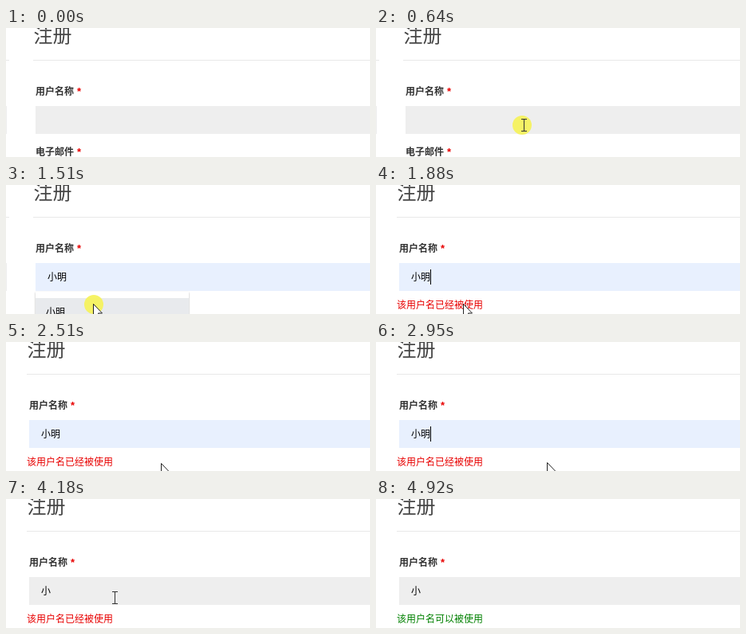
These frames come from a looping animation (456x162 px, 6.55 s). An HTML page:

```html
<!DOCTYPE html>
<html lang="zh-CN">
<head>
<meta charset="utf-8">
<title>注册</title>
<style>
  html, body { margin: 0; width: 100%; height: 100%; overflow: hidden; background: #fff; }
  svg { display: block; }
  text { font: 12px "Noto Sans CJK SC", "Noto Sans CJK", sans-serif; fill: #000; }
  .title { font-size: 24px; font-weight: 300; fill: #444; }
  .label { font-weight: 700; fill: #333; }
  .star { font: bold 13px "Liberation Sans", sans-serif; fill: #e80000; }
  rect { shape-rendering: crispEdges; }
</style>
</head>
<body>
<svg width="456" height="162" viewBox="0 0 456 162">
  <defs>
    <filter id="shadow" x="-5%" y="-20%" width="110%" height="140%">
      <feDropShadow dx="0" dy="1" stdDeviation="1" flood-color="#000" flood-opacity=".3"/>
    </filter>
  </defs>
  <rect width="456" height="162" fill="#fff"/>
  <g id="page">
    <text class="title" x="34.5" y="18">注册</text>
    <rect x="-40" y="40" width="44" height="1" fill="#e8e8e8"/>
    <rect x="34" y="40" width="440" height="1" fill="#e8e8e8"/>
    <rect x="-40" y="98" width="41" height="35" fill="#eee"/>
    <text class="label" x="37" y="84">用户名称</text>
    <text class="star" x="89" y="84">*</text>
    <rect id="field" x="37" y="98" width="440" height="35"/>
    <text id="value" x="52" y="119.5"></text>
    <rect id="caret" y="106" width="1" height="19" fill="#000"/>
    <g id="email">
      <text class="label" x="37" y="160">电子邮件</text>
      <text class="star" x="89" y="160">*</text>
    </g>
    <text id="note" x="34" y="155"></text>
    <g id="menu">
      <rect x="37" y="134" width="192" height="50" fill="#fff" filter="url(#shadow)"/>
      <rect id="hover" x="37" y="142" width="192" height="40" fill="#e8eaed"/>
      <text x="50" y="164">小明</text>
    </g>
  </g>
  <g id="pointer">
    <circle id="glow" r="12" fill="#f5f25a" fill-opacity=".93"/>
    <path id="arrow" d="M.5 .5V16.5L4 13L6.6 18.6L9 17.6L6.5 12H11.5Z" fill="#fff" stroke="#222"/>
    <path id="beam" d="M-3 -7.5H4M.5 -7.5V7.5M-3 7.5H4" fill="none" stroke="#333"/>
  </g>
</svg>
<script>
const LOOP = 6550, BLINK = 530, GLOW = 150;

// Moments of the story, in ms
const ENTER = 80, FOCUS = 720, PREVIEW = 1000, PICK = 1610, TAKEN = 1650;
const ERASE = 4180, SUGGEST = 4230, LEAVE = 4610, FREE = 4920;
const CLICKS = [570, 1460, 3440];

// Pointer rests: arrival time, travel time, place
const stops = [
  { at: ENTER, trip: 1, x: 250, y: 158 },
  { at: 560, trip: 480, x: 185, y: 122 },
  { at: 1100, trip: 330, x: 109, y: 149 },
  { at: 2510, trip: 630, x: 194, y: 152 },
  { at: 2690, trip: 180, x: 214, y: 151 },
  { at: 3300, trip: 350, x: 136, y: 124 },
  { at: LEAVE, trip: 230, x: 280, y: 113 }
];

const $ = id => document.getElementById(id);
const show = (id, on) => $(id).setAttribute("visibility", on ? "inherit" : "hidden");
const place = (id, x, y) => $(id).setAttribute("transform", `translate(${x} ${y})`);
const within = (t, a, b) => t >= a && t < b;

function pointerAt(t) {
  let { x, y } = stops[0];
  for (const s of stops) {
    const p = Math.min(1, Math.max(0, (t - s.at + s.trip) / s.trip));
    const ease = p * p * (3 - 2 * p);
    x += (s.x - x) * ease;
    y += (s.y - y) * ease;
  }
  return [Math.round(x), Math.round(y)];
}

function drawForm(t) {
  const moved = t >= TAKEN, free = t >= FREE;
  const text = t < PREVIEW ? "" : t < ERASE ? "小明" : "小";
  place("page", moved ? -8 : 0, 0);
  $("field").setAttribute("fill", within(t, PREVIEW, ERASE) ? "#e8f0fe" : "#eee");
  $("value").textContent = text;
  $("note").textContent = moved ? `该用户名${free ? "可以" : "已经"}被使用` : "";
  $("note").style.fill = free ? "#008000" : "#e80000";
  show("email", !moved);
  show("menu", within(t, FOCUS, PICK) || within(t, SUGGEST, FREE));
  show("hover", within(t, PREVIEW, PICK));

  // The blink restarts whenever the field takes focus
  const since = [FOCUS, PICK, CLICKS[2]].filter(f => f <= t).pop();
  const focused = within(t, FOCUS, PREVIEW) || within(t, PICK, FREE);
  show("caret", focused && (t - since) % (2 * BLINK) < BLINK);
  $("caret").setAttribute("x", 52 + 12 * text.length);
}

function drawPointer(t) {
  const [x, y] = pointerAt(t);
  const inField = y < 133;
  show("pointer", within(t, ENTER, LEAVE));
  place("pointer", x, y);
  show("beam", inField);
  show("arrow", !inField);
  show("glow", CLICKS.some(c => within(t, c, c + GLOW)));
  place("glow", inField ? -2 : 1, inField ? 0 : 1);
}

const start = performance.now();
function tick() {
  const t = (performance.now() - start) % LOOP;
  drawForm(t);
  drawPointer(t);
  requestAnimationFrame(tick);
}
tick();
</script>
</body>
</html>
```
